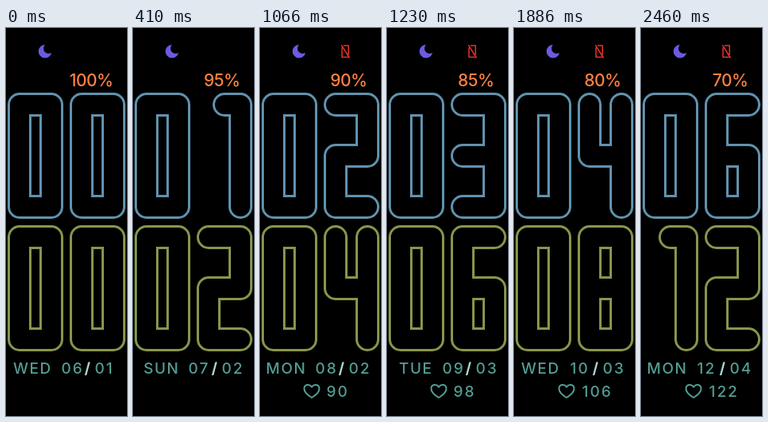
Recreate the animation shown at these times as an HTML page with a canvas. Size 152 px wide and 486 px high, loop 2870 ms.

```html
<!DOCTYPE html>
<html lang="en">
<head>
<meta charset="utf-8">
<title>Watch face</title>
<style>
  html, body { margin: 0; width: 100%; height: 100%; overflow: hidden; background: #000; }
  canvas { display: block; width: 152px; height: 486px; }
</style>
</head>
<body>
<canvas id="face"></canvas>
<script>
const W = 152, H = 486, STEP = 410, STEPS = 7;
const BLUE = '#6092af', GREEN = '#86964a', TEAL = '#539c94';
const ORANGE = '#ff8142', PURPLE = '#6a5be2', RED = '#ea3329', PALE = '#c4dcd4';
const DAYS = ['WED', 'SUN', 'MON', 'TUE'];

// Digit outlines: each pair is a column and a row of this grid.
const COLS = [1.5, 28.5, 41.5, 68.5, 21.5];
const ROWS = [1.5, 28.5, 65.5, 92.5, 129.5, 156.5];
const BOX = '00 30 35 05';
const DIGITS = {
  0: [BOX, '11 21 24 14'],
  1: ['40 30 35 25 21 41'],
  2: ['00 30 33 13 14 34 35 05 02 22 21 01'],
  3: ['00 30 35 05 04 24 23 03 02 22 21 01'],
  4: ['00 10 12 22 20 30 35 25 23 03'],
  5: ['00 30 31 11 12 32 35 05 04 24 23 03'],
  6: ['00 30 31 11 12 32 35 05', '13 23 24 14'],
  8: [BOX, '11 21 22 12', '13 23 24 14']
};

const canvas = document.getElementById('face');
const ctx = canvas.getContext('2d');
const scale = window.devicePixelRatio || 1;
canvas.width = W * scale;
canvas.height = H * scale;

const pad = n => String(n).padStart(2, '0');

function outline(code, ox, oy) {
  const pts = code.split(' ').map(([c, r]) => ({
    x: ox + COLS[c],
    y: oy + ROWS[r],
    // Corners inside the digit stay sharp.
    radius: (c === '1' || c === '2') && r > 0 && r < 5 ? 0 : 13.5
  }));
  ctx.beginPath();
  ctx.moveTo((pts[0].x + pts[1].x) / 2, (pts[0].y + pts[1].y) / 2);
  for (let k = 1; k <= pts.length; k++) {
    const p = pts[k % pts.length], q = pts[(k + 1) % pts.length];
    ctx.arcTo(p.x, p.y, q.x, q.y, p.radius);
  }
  ctx.closePath();
  ctx.stroke();
}

function bigNumber(n, y, color) {
  ctx.strokeStyle = color;
  ctx.lineWidth = 3;
  ctx.lineJoin = 'miter';
  [...pad(n)].forEach((d, k) => DIGITS[d].forEach(code => outline(code, 2 + k * 78, y)));
}

// Places the visible left or right edge of the text at x.
function label(text, x, y, { color = TEAL, size = 19, spacing = 2, right = false } = {}) {
  ctx.font = `500 ${size}px Inter, sans-serif`;
  ctx.letterSpacing = spacing + 'px';
  ctx.fillStyle = color;
  const m = ctx.measureText(text);
  ctx.fillText(text, right ? x - m.actualBoundingBoxRight : x + m.actualBoundingBoxLeft, y);
}

function line(path, color, width) {
  ctx.strokeStyle = color;
  ctx.lineWidth = width;
  ctx.lineCap = ctx.lineJoin = 'round';
  ctx.stroke(path);
}

const moon = new Path2D('M49 21A8.3 8.3 0 1 0 57.2 31A6.5 6.5 0 0 1 49 21Z');
const phoneOff = new Path2D('M103 25V36.5H110M105.5 22H111.2V33M102.6 21.8L112.2 37');
const heart = new Path2D('M65 463C60 460 55.5 456.5 55.5 451.8C55.5 446.5 62 445.3 65 449.6' +
  'C68 445.3 74.5 446.5 74.5 451.8C74.5 456.5 70 460 65 463Z');

function draw(i) {
  ctx.setTransform(scale, 0, 0, scale, 0, 0);
  ctx.fillStyle = '#000';
  ctx.fillRect(0, 0, W, H);

  ctx.fillStyle = PURPLE;
  ctx.fill(moon);
  label(100 - 5 * i + '%', 133, 73.4, { color: ORANGE, size: 21, spacing: -0.5, right: true });

  bigNumber(i, 81, BLUE);
  bigNumber(2 * i, 247, GREEN);

  label(DAYS[i % 4], 55.5, 433.3, { spacing: 1.5, right: true });
  label(pad(6 + i), 70.5, 433);
  label('/', 98.3, 433);
  label('/', 99, 433, { color: PALE });
  label(pad(1 + Math.ceil(i / 2)), 112.5, 433);

  if (i < 2) return;
  line(phoneOff, RED, 1.5);
  const bpm = 74 + 8 * i, shift = bpm > 99 ? 1 : 0;
  ctx.translate(shift, 0);
  line(heart, TEAL, 2);
  label(String(bpm), 84.5, 461.8);
}

let start = null;
function tick(now) {
  if (start === null) start = now;
  draw(Math.floor(Math.max(0, now - start) / STEP) % STEPS);
  requestAnimationFrame(tick);
}
draw(0);
requestAnimationFrame(tick);
</script>
</body>
</html>
```
